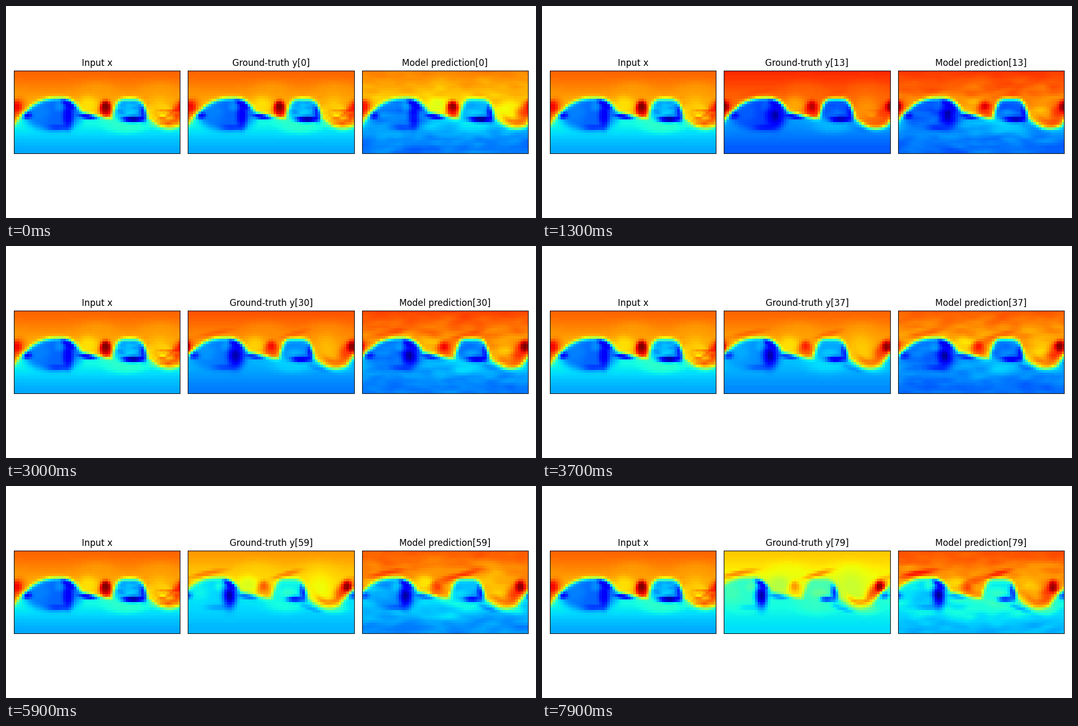
A matplotlib script that plays this animation: 1000 by 400 pixels, repeating every 8 s.

```python
import numpy as np
import matplotlib.pyplot as plt
from matplotlib.animation import FuncAnimation

FRAMES, COLS, ROWS = 80, 64, 32
RISE = 13  # steps until the levels turn around
U, V = np.meshgrid(np.arange(COLS) + 0.5, np.arange(ROWS) + 0.5)


def cyclic(d):
    return (d + COLS / 2) % COLS - COLS / 2


def dome(x, centre, top, left, right):
    """Power-law bump; each side is (half width, depth, power)."""
    d = cyclic(x - centre)
    sides = [h * np.abs(d / w) ** p for w, h, p in (left, right)]
    return top + np.where(d < 0, *sides)


def edge(x):
    """Height of the layer between the warm and the cold stream."""
    saddle = np.clip(15.8 + 0.25 * (x - 27), 15, 18)
    trough = 21.9 - 0.066 * cyclic(x - 59.7) ** 2
    floor = np.where((x > 20) & (x < 41), saddle, trough)
    floor = np.where((x >= 41) & (x < 51) | (x > 5) & (x <= 20), 22, floor)
    big = dome(x, 17, 10.2, (17, 10.2, 2.4), (9, 4.8, 3))
    small = dome(x, 44.5, 10.5, (7, 7, 4.4), (7.2, 6, 4))
    return np.minimum(floor, np.minimum(big, small))


EDGE_X = np.linspace(0, COLS, 400, endpoint=False)
EDGE_Y = edge(EDGE_X)

# Levels on the colour scale: at the start, at the turn, at the end.
TRUTH = dict(speed=0.092, lead=0, rough=0, dip=0,
             top=(.805, .865, .70), spot=(1, .95, .75),
             near=(.385, .285, .385), low=(.295, .215, .345),
             big=(.225, .19, .40))
MODEL = dict(speed=0.065, lead=0.5, rough=0.011, dip=0.065,
             top=(.77, .85, .82), spot=(.98, .92, .84),
             near=(.32, .305, .385), low=(.25, .23, .31),
             big=(.235, .205, .335))


def smooth_noise(seed, across, down):
    a = np.random.default_rng(seed).normal(size=(ROWS, COLS))
    for axis in [1] * across + [0] * down:
        a = (np.roll(a, 1, axis) + 2 * a + np.roll(a, -1, axis)) / 4
    return a / a.std()


GRAIN = [smooth_noise(k, 8, 1) for k in range(5)]
SPECKLE = smooth_noise(40, 1, 0)


def grain(n):
    k, t = divmod(n / 20, 1)
    a, b = GRAIN[int(k)], GRAIN[int(k) + 1]
    return (a * (1 - t) + b * t) / np.hypot(t, 1 - t)


def flow(n, cfg):
    age = n / (FRAMES - 1)
    rise = min(n / RISE, 1)
    fall = max(n - RISE, 0) / (FRAMES - 1 - RISE)
    dip = cfg["dip"] * np.exp(-((n - 47) / 11) ** 2)

    def level(key):
        start, peak, end = cfg[key]
        return start + (peak - start) * rise + (end - peak) * fall

    top, near, low, big = (level(k) - dip for k in ("top", "near", "low", "big"))
    spot = level("spot")
    mid, trough, rim = top - 0.07, top - 0.11, 0.46 + 0.4 * top
    small = big + 0.065 - 0.05 * rise + 0.02 * fall

    speed, rough = cfg["speed"], cfg["rough"]
    s = (U + cfg["lead"] + speed * n) % COLS

    def put(f, value, x, y, rx, ry, amount=1.0, tilt=0.0, power=3):
        dx = cyclic(s - x)
        r = np.hypot(dx / rx, (V - y - tilt * dx) / ry)
        f += (value - f) * amount * np.exp(-r ** power)

    gap = cyclic(s[..., None] - EDGE_X) ** 2 + (V[..., None] - EDGE_Y) ** 2
    depth = np.sqrt(gap.min(axis=-1)) * np.sign(V - edge(s)) - 0.55

    # warm stream
    warm = top + (mid - top) * np.clip(V / 11, 0, 1) ** 1.3
    for x in (32, 56):
        put(warm, mid, x, 8, 8, 4, 0.6)
    put(warm, trough - 0.03, 28.5, 13.5, 4.2, 3.5, 0.9)
    put(warm, trough, 56, 15.5, 4.5 + age, 5 + 2 * age)
    streak = top + 0.03 + 0.03 * age
    put(warm, streak, 13, 9, 7, 1.1, age, -0.2)
    put(warm, streak, 43.5, 9.3, 5.5, 1.1, age, -0.28)
    band = np.exp(-((depth + 2.4) / 1.1) ** 2)
    warm += (rim - warm) * band * np.exp(-(cyclic(s - 60) / 5) ** 4)

    red = 35.2 - (0.1 - speed) * n
    if rough:
        put(warm, spot - 0.02, red + 2, 12, 5, 1.6, age, -0.4)
    put(warm, spot - 0.06, red, 15, 2.4 + 0.4 * rise, 3.4, 1, 0, 4)
    put(warm, spot, red, 13.8, 1.5, 1.7)
    hot = 1 + (speed - 0.062) * n
    put(warm, 0.86, hot - 1, 15, 3.8, 3.4, 0.9, -0.5)
    put(warm, 0.90 + 0.09 * rise, hot, 14, 1.8, 2.2)

    # cold stream
    cold = near + (low - near) * np.clip((V - 19) / 11, 0, 1)
    put(cold, near + 0.03, 43, 21, 8, 3.2, 0.8)
    put(cold, near + 0.05, 62, 22.5, 5, 2, age)
    put(cold, low - 0.03, 53, 22.5, 4, 0.9, age, 0.3)
    put(cold, big, 15, 16.5, 11.5, 7, 1, 0, 6)
    put(cold, small, 45, 15, 7, 5.2, 1, 0, 6)
    put(cold, big + 0.05, 18, 14, 2.5, 2, 0.8)
    put(cold, big + 0.04, 10, 16, 4, 4, 0.7)
    put(cold, big - 0.06, 17, 22, 4.5, 1.2, 0.8)
    put(cold, small + 0.05, 44, 16.5, 3, 1.8, 0.7)

    # dark cores
    core = 20.8 + age - cfg["lead"]
    put(cold, 0.10, core, 17.5, 2 + 1.5 * rise - fall, 5, 0.85 + 0.1 * rise)
    put(cold, 0.08, core, 12.8, 2.8, 1.5, 0.9, 0.6)
    put(cold, 0.03, core, 17.5, 1.4, 2.2, 0.9 * rise)
    put(cold, 0.09 + 0.13 * age, 5, 17.5, 2, 1.3, 0.9)
    put(cold, 0.05 + 0.19 * age, 28.7, 17.7, 3.8, 1.2, 0.95, 0.1)
    put(cold, 0.11, 50, 15.5, 1.5, 4, 0.85)
    put(cold, 0.02 + 0.17 * age, 46 + age, 18.9, 4.2 - 1.3 * age, 1.15)

    w = 0.5 * (1 + np.tanh(depth / 0.75))
    f = warm * (1 - w) + cold * w
    if rough:
        f += rough * grain(n) * (0.4 + 0.6 * np.clip(V / 6, 0, 1))
    else:
        inside = sum(a * np.exp(-(cyclic(s - x) / 6) ** 4 - ((V - y) / 4) ** 4)
                     for a, x, y in ((1, 58, 18), (0.5, 45, 14)))
        f += 0.03 * SPECKLE * inside * np.exp(-n / 10)
    return np.clip(f, 0, 1)


fig = plt.figure(figsize=(10, 4), dpi=100)
WIDTH, HEIGHT, PAD = 940 / 3, 470 / 3, 15


def panel(k, cfg, title):
    left = PAD + k * (WIDTH + PAD)
    ax = fig.add_axes([left / 1000, 0.5 - HEIGHT / 800,
                       WIDTH / 1000, HEIGHT / 400])
    ax.set(xticks=[], yticks=[])
    img = ax.imshow(flow(0, cfg), cmap="jet", vmin=0, vmax=1, aspect="auto",
                    interpolation="nearest")
    return img, ax.set_title(title, fontsize=12)


panel(0, TRUTH, "Input x")
LIVE = [(cfg, name, *panel(k, cfg, f"{name}[0]")) for k, cfg, name in
        ((1, TRUTH, "Ground-truth y"), (2, MODEL, "Model prediction"))]


def update(n):
    for cfg, name, img, title in LIVE:
        img.set_data(flow(n, cfg))
        title.set_text(f"{name}[{n}]")


anim = FuncAnimation(fig, update, frames=FRAMES, interval=100, repeat=True,
                     repeat_delay=0, blit=False)
plt.show()
```
